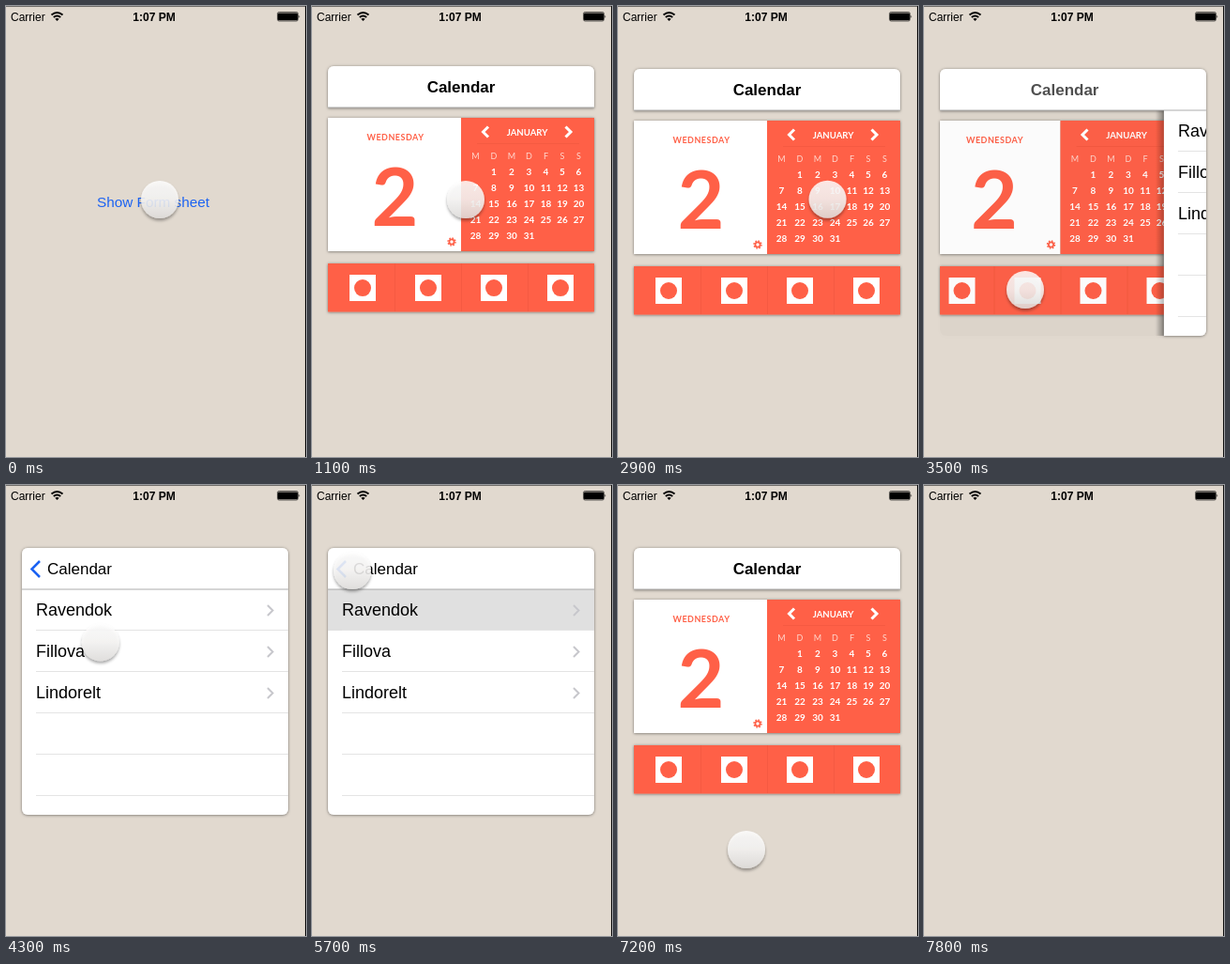
An HTML page for the animation above (8700 ms loop, 320 by 480 pixels).

```html
<!DOCTYPE html>
<html lang="en">
<head>
<meta charset="utf-8">
<title>Form sheet</title>
<style>
html, body { margin: 0; width: 100%; height: 100%; overflow: hidden; background: #e1d9cf; }
svg { display: block; width: 320px; height: 480px; }
text { font-family: "Liberation Sans", Arial, sans-serif; white-space: pre; }
.mid { text-anchor: middle; }
.bold { font-weight: 700; }
.lato { font-family: Lato, sans-serif; font-weight: 700; text-anchor: middle; }
.red { fill: #ff6047; }
.white { fill: #fff; }
.line { fill: none; stroke-width: 2; }
</style>
</head>
<body>
<svg viewBox="0 0 320 480">
  <defs>
    <clipPath id="frame"><rect x="17" y="67" width="284" height="284" rx="6"/></clipPath>
    <filter id="glow" x="-5%" y="-5%" width="110%" height="110%">
      <feDropShadow dx="0" dy="0.5" stdDeviation="1.6" flood-opacity=".5"/>
    </filter>
    <filter id="drop" x="-30%" y="-30%" width="160%" height="170%">
      <feDropShadow dx="0" dy="2.5" stdDeviation="1.5" flood-opacity=".4"/>
    </filter>
    <linearGradient id="ball" x2="0" y2="1">
      <stop stop-color="#fff"/><stop offset=".5" stop-color="#f8f7f6"/><stop offset="1" stop-color="#e2e0de"/>
    </linearGradient>
    <linearGradient id="edge">
      <stop stop-opacity="0"/><stop offset="1" stop-opacity=".28"/>
    </linearGradient>
  </defs>

  <rect width="320" height="480" fill="#e1d9cf"/>
  <text id="button" class="mid" x="157" y="213.5" font-size="15.3" fill="#1c63f2">Show Form sheet</text>

  <g id="sheet" filter="url(#glow)">
    <g clip-path="url(#frame)">
      <g id="main">
        <path class="white" d="M17 122h142v142h-142z"/>
        <path class="red" d="M159 122h142v142h-142zM17 277h284v51.500h-284z"/>
        <text class="lato red" x="89" y="146" font-size="9" letter-spacing=".5">WEDNESDAY</text>
        <text class="lato red" x="88.500" y="237" font-size="86">2</text>
        <circle cx="149" cy="254" r="2.600" fill="none" stroke="#ff6047" stroke-width="1.800"/>
        <circle cx="149" cy="254" r="4" fill="none" stroke="#ff6047" stroke-width="1.400" stroke-dasharray="1.570 1.570"/>
        <path class="line" stroke="#fff" style="stroke-width:3" d="M188 131.500l-5.500 5.500 5.500 5.500M270.500 131.500l5.500 5.500-5.500 5.500"/>
        <text class="lato white" x="229.500" y="140.500" font-size="9.600">JANUARY</text>
        <path d="M176 149.500h109M88.500 277v51M159.500 277v51M230.500 277v51" stroke="#ee5840" stroke-opacity=".6"/>
      </g>
      <rect id="dim" x="17" y="111" width="284" height="240"/>
      <g id="list">
        <rect x="8" y="111" width="9" height="240" fill="url(#edge)"/>
        <rect class="white" x="17" y="111" width="284" height="240"/>
        <rect id="pick" x="17" y="111" width="284" height="44" fill="#e0e0e0"/>
      </g>
      <rect class="white" x="17" y="67" width="284" height="44"/>
      <path d="M17 111h284" stroke="#999" stroke-width=".8"/>
      <text id="title" class="mid bold" x="159" y="95" font-size="17">Calendar</text>
      <g id="back">
        <path class="line" stroke="#1c63f2" style="stroke-width:2.500" d="M36 81l-8.500 8.500 8.500 8.500"/>
        <text id="label" x="44" y="95" font-size="17">Calendar</text>
      </g>
    </g>
  </g>

  <text x="5" y="16" font-size="12">Carrier</text>
  <g class="line" stroke="#000">
    <path d="M48.500 9.500q6-5 12 0M50.800 12q3.700-3 7.400 0"/>
  </g>
  <path d="M52.300 13.800q2.200-1.600 4.400 0l-2.200 2.200z"/>
  <text class="mid bold" x="158" y="16" font-size="12">1:07 PM</text>
  <rect x="289.500" y="6.500" width="22" height="9.500" rx="1.800" fill="none" stroke="#000" stroke-opacity=".6"/>
  <rect x="290" y="7.500" width="21" height="7.800" rx="1"/>
  <path d="M312.500 9.500q1.500 1.700 0 3.500z"/>
  <path d="M0 .3h320" stroke="#333" stroke-width=".8"/>
  <rect x="319" width="1" height="480" fill="#111"/>

  <g id="touch" filter="url(#drop)"><circle r="20" fill="url(#ball)" opacity=".84"/></g>
</svg>
<script>
const $ = id => document.getElementById(id);
const LOOP = 8700, STEP = 100;

function add(parent, tag, attrs, text = '') {
  const el = document.createElementNS('http://www.w3.org/2000/svg', tag);
  for (const k in attrs) el.setAttribute(k, attrs[k]);
  el.textContent = text;
  parent.appendChild(el);
}

// Calendar grid and share tiles
const colX = [174.5, 194, 213, 231.5, 249.5, 267, 284.5];
[...'MDMDFSS'].forEach((d, i) =>
  add($('main'), 'text', { class: 'lato', x: colX[i], y: 166, 'font-size': 9, fill: '#ffd8cf', style: 'font-weight:400' }, d));
for (let d = 1; d <= 31; d++)
  add($('main'), 'text', { class: 'lato white', x: colX[d % 7], y: 182.5 + 17 * Math.floor(d / 7), 'font-size': 10 }, d);
for (const x of [40, 110, 180, 251]) {
  add($('main'), 'rect', { class: 'white', x, y: 289, width: 28, height: 28 });
  add($('main'), 'circle', { class: 'red', cx: x + 14, cy: 303, r: 9 });
}

// List rows
['Ravendok', 'Fillova', 'Lindorelt', '', ''].forEach((name, i) => {
  const y = 111 + 44 * i;
  add($('list'), 'path', { d: `M32 ${y + 43.5}h269`, stroke: '#e4e4e4' });
  if (!name) return;
  add($('list'), 'text', { x: 32, y: y + 28, 'font-size': 18 }, name);
  add($('list'), 'path', { class: 'line', stroke: '#c7c7cc', d: `M279 ${y + 17}l5.500 5.500-5.500 5.500` });
});

const path = [
  [0, 164, 206], [1500, 164, 206], [2000, 264, 172], [2700, 264, 172],
  [3300, 108, 302], [3800, 108, 302], [4500, 99, 134], [5300, 99, 134],
  [5650, 43, 91], [6200, 43, 91], [7000, 137, 388], [7400, 137, 388],
  [7800, 350, 515], [LOOP, 350, 515]
];

const span = (t, start, length) => Math.min(1, Math.max(0, (t - start) / length));
const easeOut = p => 1 - (1 - p) ** 3;
const smooth = p => p * p * (3 - 2 * p);
const move = (id, x, y) => $(id).setAttribute('transform', `translate(${x} ${y})`);
const fade = (id, a) => $(id).setAttribute('opacity', Math.max(0, a));

function draw(t) {
  fade('button', t < 700 ? 1 : t < 1000 ? 0.25 : 0);

  const shown = easeOut(span(t, 850, 315)) - span(t, 7250, 350) ** 2;
  move('sheet', 0, -340 * (1 - shown));

  const push = easeOut(span(t, 3472, 500)) - easeOut(span(t, 5850, 500));
  const slide = 81 * push ** 1.2;
  move('main', -85 * push, 0);
  move('list', 284 * (1 - push), 0);
  fade('list', push > 0 ? 1 : 0);
  fade('dim', 0.1 * push);
  move('title', -slide, 0);
  fade('title', 1 - 2 * push);
  move('label', 81 - slide, 0);
  fade('back', 2 * push - 1);
  fade('pick', t >= 5100 ? 1 : 0);

  const i = path.findIndex(k => k[0] > t);
  const [a, b] = [path[i - 1], path[i]];
  const p = smooth(span(t, a[0], b[0] - a[0]));
  move('touch', a[1] + (b[1] - a[1]) * p, a[2] + (b[2] - a[2]) * p);
}

const begin = performance.now();
function tick() {
  const t = (performance.now() - begin) % LOOP;
  draw(Math.floor(t / STEP) * STEP);
  requestAnimationFrame(tick);
}
tick();
</script>
</body>
</html>
```
